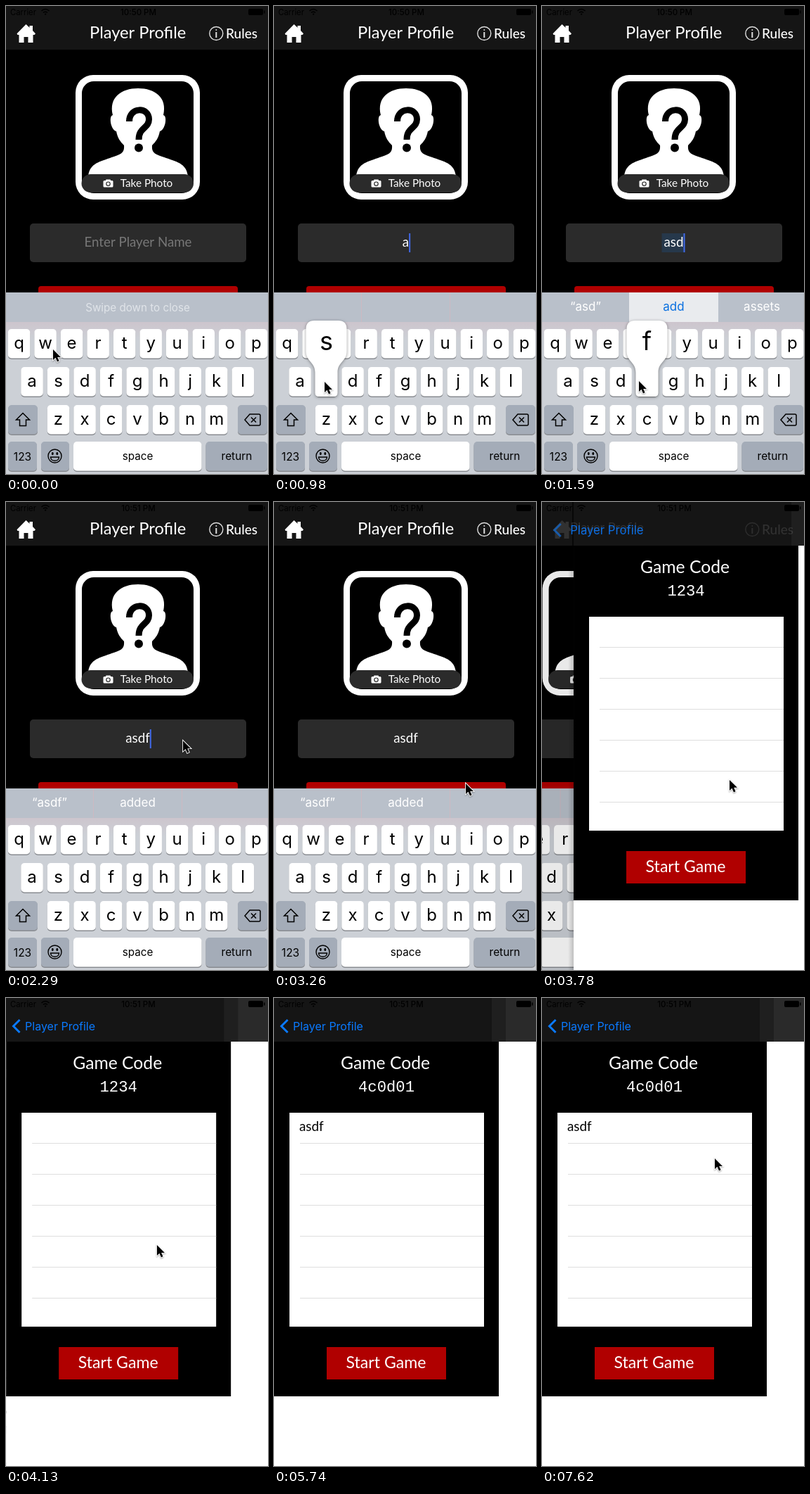
An HTML page with a canvas that plays this animation: 373 by 665 pixels, repeating every 8000 ms.

```html
<!DOCTYPE html>
<html lang="en">
<head>
<meta charset="utf-8">
<title>Player Profile</title>
<style>
  html, body { margin: 0; width: 100%; height: 100%; overflow: hidden; background: #fff; }
  canvas { display: block; width: 373px; height: 665px; }
</style>
</head>
<body>
<canvas id="stage"></canvas>
<script>
const W = 373, H = 665, LOOP = 8000, STEP = 88;
const canvas = document.getElementById('stage');
const dpr = window.devicePixelRatio || 1;
canvas.width = W * dpr;
canvas.height = H * dpr;
const c = canvas.getContext('2d');

const HUMANIST = 'Lato, sans-serif', SYSTEM = 'Inter, sans-serif', MONO = '"Liberation Mono", monospace';
const BLUE = '#0a7aff', RED = '#b00000';

// Pointer path: time, x, y
const POINTER = [
  [90, 67, 488], [520, 36, 536], [700, 36, 536], [880, 72, 534], [1060, 72, 534],
  [1230, 108, 534], [1330, 108, 534], [1500, 138, 533], [1760, 138, 533],
  [2640, 314, 234], [3170, 273, 400], [3610, 273, 400], [4040, 215, 351],
  [4224, 200, 362], [4500, 200, 362], [5280, 88, 294], [5450, 20, 228],
  [7120, 88, 130], [7520, 246, 228]
];
const PRESSES = [
  { key: 'a', x: 37, down: 520, up: 690 },
  { key: 's', x: 74.5, down: 960, up: 1120 },
  { key: 'd', x: 112, down: 1220, up: 1390 },
  { key: 'f', x: 149.5, down: 1490, up: 1670 }
];
const SUGGESTIONS = [[], [], ['“as”', 'ask'], ['“asd”', 'add', 'assets'], ['“asdf”', 'added']];

const lerp = (a, b, k) => a + (b - a) * k;

function rect(x, y, w, h, fill, r = 0) {
  c.beginPath();
  c.roundRect(x, y, w, h, r);
  c.fillStyle = fill;
  c.fill();
}

function text(str, x, y, size, color, family = HUMANIST, align = 'center', weight = 400) {
  c.font = `${weight} ${size}px ${family}`;
  c.textAlign = align;
  c.fillStyle = color;
  c.fillText(str, x, y);
}

function fill(d, color) {
  c.fillStyle = color;
  c.fill(new Path2D(d));
}

function stroke(d, color, width) {
  c.strokeStyle = color;
  c.lineWidth = width;
  c.stroke(new Path2D(d));
}

function at(x, y, draw) {
  c.save();
  c.translate(x, y);
  draw();
  c.restore();
}

function faded(alpha, draw) {
  c.save();
  c.globalAlpha = alpha;
  draw();
  c.restore();
}

function avatar() {
  rect(99, 98, 177, 177, '#fff', 25);
  rect(108, 107, 159, 159, '#000', 17);
  for (const side of [1, -1]) at(188, 0, () => {
    c.scale(side, 1);
    fill('M1 117H0C-24 117-42 130-36 155C-42 156-39 176-31 178C-29 188-25 193-20 198C-19 210-26 211-40 216C-58 222-69 225-71 242H1Z', '#fff');
  });
  stroke('M175.500 164C175.500 143 203.500 143 203.500 161C203.500 174 189 172 189 190', '#000', 9);
  rect(183, 195.500, 12, 12, '#000', 6);
  rect(107.500, 239, 159.500, 26, '#2b2b2b', 13);
  rect(138.500, 248, 14, 9.500, '#fff', 1.500);
  rect(142, 246.500, 7, 3, '#fff', 1);
  c.beginPath();
  c.arc(145.500, 252.700, 2.700, 0, 7);
  c.strokeStyle = '#2b2b2b';
  c.lineWidth = 1.200;
  c.stroke();
  text('Take Photo', 200, 257, 15.300, '#fff');
}

function nameField(typed, caret) {
  rect(34, 309, 308, 55, '#2b2b2b', 5);
  if (!typed) return text('Enter Player Name', 188, 342, 18.700, '#777');
  c.font = `18.800px ${HUMANIST}`;
  const half = c.measureText(typed).width / 2;
  if (typed === 'asd') rect(187.500 - half - 3, 323, half * 2 + 5, 27, '#26384b');
  text(typed, 187.500, 342, 18.800, '#fff');
  if (caret) rect(187.500 + half, 323, 2, 27, '#4169e8');
}

function key(x, y, w, color = '#fff') {
  rect(x, y + 1, w, 42, '#898c91', 5);
  rect(x, y, w, 41.500, color, 5);
}

function letterRow(letters, firstCenter, y) {
  [...letters].forEach((letter, i) => {
    const x = firstCenter + i * 37.530;
    key(x - 15.700, y, 31.500);
    text(letter, x, y + 27.500, 24, '#000', SYSTEM);
  });
}

function suggestionBar(count) {
  rect(0, 407, W, 42, '#b9c0ca');
  if (!count) return text('Swipe down to close', 187.500, 433.500, 15.200, '#e0e4e9', SYSTEM);
  const correcting = count === 3;
  if (correcting) rect(124, 407, 127, 42, '#e9ebee');
  else for (const x of [124, 250]) rect(x, 407, 1, 42, '#cdb9c2');
  SUGGESTIONS[count].forEach((word, i) =>
    text(word, 62 + i * 125.500, 433, 17, correcting && i === 1 ? '#0a70e0' : '#fff', SYSTEM));
}

function popup({ key: letter, x }) {
  c.save();
  c.shadowColor = 'rgba(0,0,0,.4)';
  c.shadowBlur = 4;
  c.shadowOffsetY = 1;
  at(x, 0, () => fill('M-29 459Q-29 447-17 447H17Q29 447 29 459V490C29 506 16 505 16 521V550Q16 555 11 555H-11Q-16 555-16 550V521C-16 505-29 506-29 490Z', '#fff'));
  c.restore();
  text(letter, x, 489, 36, '#000', SYSTEM);
}

function keyboard(t, count) {
  const grey = '#a4acb8';
  rect(0, 407, W, 258, '#ccd0d6');
  const tint = c.createLinearGradient(0, 449, 0, 475);
  tint.addColorStop(0, 'rgba(210,130,150,.14)');
  tint.addColorStop(1, 'rgba(210,130,150,0)');
  rect(0, 449, W, 26, tint);
  suggestionBar(count);
  letterRow('qwertyuiop', 18.500, 459);
  letterRow('asdfghjkl', 37, 513);
  letterRow('zxcvbnm', 74.500, 567);
  key(3, 567, 42, grey);
  key(330, 567, 42, grey);
  key(3, 619, 41, grey);
  key(50, 619, 40, grey);
  key(96, 619, 182.500);
  key(284.500, 619, 87.500, grey);
  stroke('M24 578.500L33.500 588H28.500V596.500H19.500V588H14.500Z', '#000', 1.500);
  stroke('M347 580H360Q362 580 362 582V594Q362 596 360 596H347L340 588ZM349 584.500L356 591.500M356 584.500L349 591.500', '#000', 1.500);
  text('123', 23.500, 645.500, 15.500, '#000', SYSTEM);
  text('space', 187.500, 645, 15.200, '#000', SYSTEM);
  text('return', 328.500, 645, 15.400, '#000', SYSTEM);
  stroke('M79 639.500A9.500 9.500 0 1 1 60 639.500A9.500 9.500 0 1 1 79 639.500M63.500 641H75.500C75 648 64 648 63.500 641Z', '#000', 1.400);
  rect(65, 634, 2.600, 4, '#000', 1.300);
  rect(71.500, 634, 2.600, 4, '#000', 1.300);
  const pressed = PRESSES.find(p => t >= p.down && t < p.up);
  if (pressed) popup(pressed);
}

function profileView(t) {
  const count = PRESSES.filter(p => t >= p.up).length;
  rect(0, 0, W, H, '#000');
  avatar();
  nameField('asdf'.slice(0, count), t < 2800);
  rect(46, 398, 284, 40, RED, 4);
  keyboard(t, count);
}

function gameView(joined) {
  rect(0, 0, W, H, '#fff');
  rect(0, 0, 320, 566, '#000');
  text('Game Code', 158.500, 101, 24.700, '#fff');
  text(joined ? '4c0d01' : '1234', 160, 132.500, 22.200, '#fff', MONO);
  rect(22, 163, 277, 304, '#fff');
  for (let y = 206; y < 467; y += 44) rect(37, y, 262, 1, '#dedede');
  if (joined) text('asdf', 36, 189, 18.800, '#000', HUMANIST, 'left');
  rect(75, 496, 170, 46, RED);
  text('Start Game', 159.500, 526, 23.100, '#fff');
}

function statusBar(t) {
  text('Carrier', 6, 12.500, 11.300, '#000', SYSTEM, 'left');
  text(t < 2200 ? '10:50 PM' : '10:51 PM', 188.500, 12.500, 11.500, '#000', SYSTEM, 'center', 500);
  stroke('M50.500 7Q56 2 61.500 7M53 9.500Q56 7 59 9.500', '#000', 1.600);
  rect(55, 10.500, 2.200, 2.200, '#000', 1);
  rect(345, 4, 21, 9, '#000', 2);
  rect(367, 6.500, 1.500, 4, '#000');
}

function navBar(t, p, edge) {
  rect(0, 0, W, 62, '#151515');
  if (p > 0) {
    rect(edge + 310, 0, 20, 62, '#1f1f1f');
    rect(edge + 330, 0, W, 62, '#2a2a2a');
    if (edge > 1) rect(edge - 2, 0, 2, 62, 'rgba(0,0,0,.6)');
  }
  statusBar(t);
  faded(1 - p, () => {
    fill('M28.500 26L33.500 30.800V28H38V35L42 39.200L40.500 41H38.500V52H31.500V44H25.500V52H18.500V41H16.500L15.500 39.200Z', '#fff');
    stroke('M308.800 39A9.500 9.500 0 1 1 289.800 39A9.500 9.500 0 1 1 308.800 39', '#ddd', 1.400);
    rect(298.300, 33, 2, 2, '#ddd', 1);
    rect(298.300, 37, 2, 8, '#ddd');
    text('Rules', 313, 46, 19, '#fff', HUMANIST, 'left', 500);
  });
  // The title shrinks into the back label while the two cross-fade.
  const x = lerp(119, 27, p * 0.92 + 0.08 * p ** 4);
  faded(1 - p, () => text('Player Profile', x, lerp(46, 42, p), lerp(23.700, 17.300, p), '#fff', HUMANIST, 'left'));
  faded(p, () => {
    text('Player Profile', x, 46, lerp(22, 16, p), BLUE, SYSTEM, 'left');
    at(lerp(60, 0, p), 0, () => faded(p ** 4, () => stroke('M19.500 31L10.500 40L19.500 49', BLUE, 3)));
  });
}

function pointer(t) {
  if (t >= 5540 && t < 7120 || t >= 7600) return;
  const last = POINTER.length - 1;
  let i = POINTER.findIndex(k => k[0] > t);
  if (i < 0) i = last;
  const b = POINTER[i], a = POINTER[Math.max(0, i - 1)];
  const k = a === b ? 0 : Math.min(1, (t - a[0]) / (b[0] - a[0]));
  const ease = k * k * (3 - 2 * k);
  at(lerp(a[1], b[1], ease), lerp(a[2], b[2], ease), () => {
    const arrow = 'M0 0V15L3.500 11.800L6 17.500L8.600 16.300L6.200 10.900H11Z';
    c.save();
    c.shadowColor = 'rgba(0,0,0,.35)';
    c.shadowBlur = 2;
    c.shadowOffsetY = 1;
    stroke(arrow, '#fff', 1.800);
    c.restore();
    fill(arrow, '#000');
  });
}

// Critically damped spring used for the screen push
function pushProgress(t) {
  const s = Math.max(0, t - 3496) * 0.01826;
  return t > 4200 ? 1 : 1 - (1 + s) * Math.exp(-s);
}

function draw(t) {
  const p = pushProgress(t), edge = W * (1 - p);
  c.setTransform(dpr, 0, 0, dpr, 0, 0);
  if (p < 1) at(-0.3 * W * p, 0, () => profileView(t));
  if (p > 0) {
    rect(0, 0, W, H, `rgba(0,0,0,${0.1 * p})`);
    const shade = c.createLinearGradient(edge - 8, 0, edge, 0);
    shade.addColorStop(0, 'rgba(0,0,0,0)');
    shade.addColorStop(1, 'rgba(0,0,0,.18)');
    rect(edge - 8, 62, 8, H, shade);
    at(edge, 0, () => gameView(t >= 5700));
  }
  navBar(t, p, edge);
  pointer(t);
}

function frame() {
  const t = performance.now() % LOOP;
  draw(Math.floor(t / STEP) * STEP);
  requestAnimationFrame(frame);
}
frame();
</script>
</body>
</html>
```
